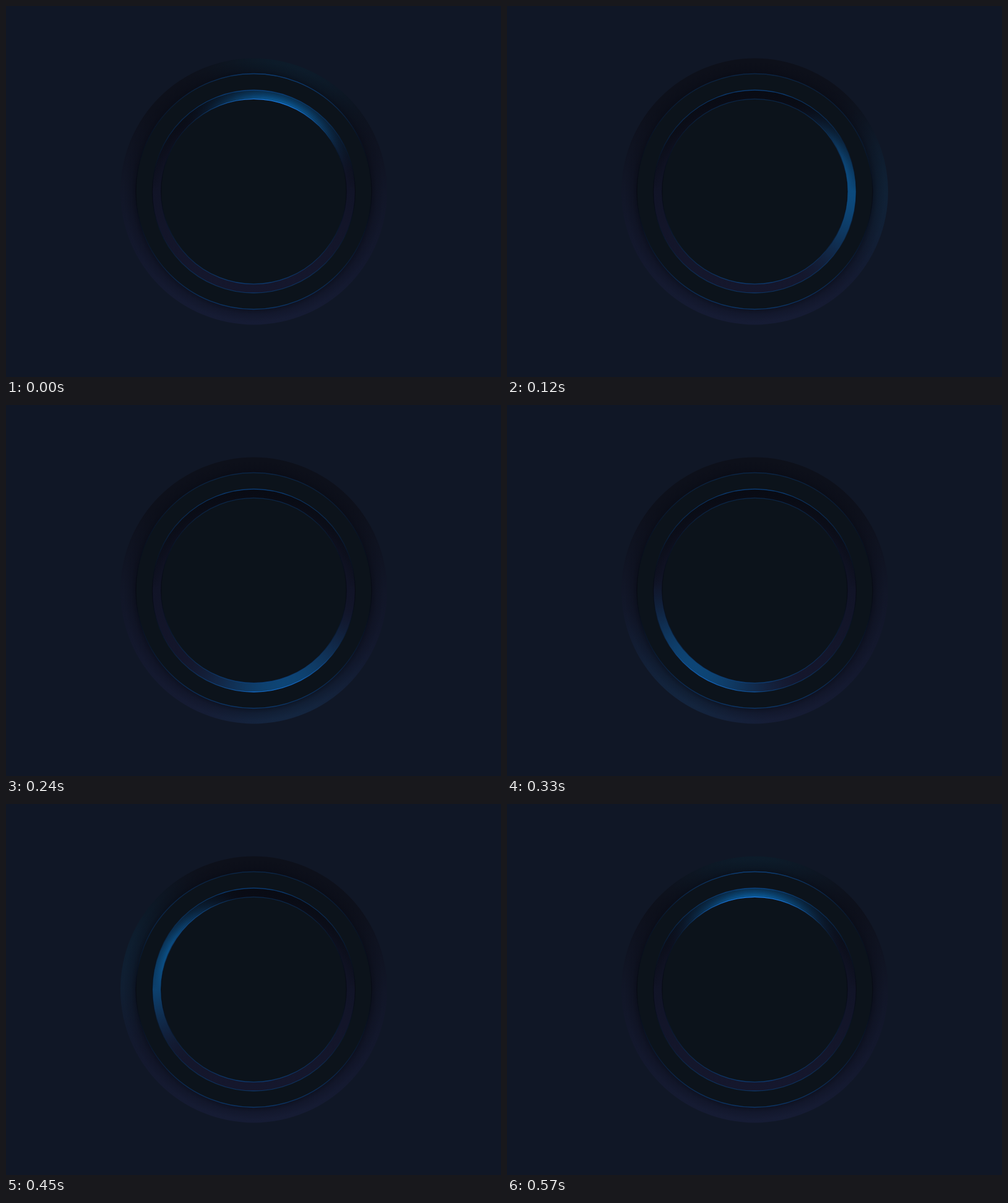
An HTML page with a canvas that plays this animation: 800x600 px, repeating every 0.6 s.

```html
<!DOCTYPE html>
<html lang="en">
<head>
<meta charset="utf-8">
<title>Glowing dial</title>
<style>
  html, body { margin: 0; width: 100%; height: 100%; overflow: hidden; background: #101726; }
  canvas { display: block; width: 800px; height: 600px; }
</style>
</head>
<body>
<canvas id="stage" width="800" height="600"></canvas>
<script>
(() => {
  const ctx = document.getElementById("stage").getContext("2d");
  const TAU = Math.PI * 2;
  const RIM = 215.5, RING_OUT = 190.5, RING_IN = 164, DISC = 149.7;
  const STEP_MS = 30, STEPS = 20;
  const FACE = "#0c131b";

  // Angles run clockwise from the top.
  function sweep(rgb, alphaAt) {
    const gradient = ctx.createConicGradient(-Math.PI / 2, 0, 0);
    const stops = 120;
    for (let i = 0; i <= stops; i++) {
      const alpha = Math.max(0, Math.min(1, alphaAt(i / stops * TAU)));
      gradient.addColorStop(i / stops, `rgba(${rgb},${alpha.toFixed(4)})`);
    }
    return gradient;
  }

  function withStops(gradient, stops) {
    for (const [offset, color] of stops) gradient.addColorStop(offset, color);
    return gradient;
  }

  const vertical = (r, stops) => withStops(ctx.createLinearGradient(0, -r, 0, r), stops);
  const radial = (from, to, stops) =>
    withStops(ctx.createRadialGradient(0, 0, from, 0, 0, to), stops);

  function disc(r, fill) {
    ctx.beginPath();
    ctx.arc(0, 0, r, 0, TAU);
    ctx.fillStyle = fill;
    ctx.fill();
  }

  function band(outer, inner, fill) {
    ctx.beginPath();
    ctx.arc(0, 0, outer, 0, TAU);
    ctx.arc(0, 0, inner, 0, TAU, true);
    ctx.fillStyle = fill;
    ctx.fill();
  }

  function line(r, stroke, width = 1.3) {
    ctx.beginPath();
    ctx.arc(0, 0, r, 0, TAU);
    ctx.strokeStyle = stroke;
    ctx.lineWidth = width;
    ctx.stroke();
  }

  const upper = a => Math.max(0, Math.cos(a));
  const lower = a => Math.max(0, -Math.cos(a));
  const side = a => Math.abs(Math.sin(a));

  // Light falloff around the direction of the beam.
  function beam(a, heading, halfWidth) {
    const distance = Math.abs(Math.atan2(Math.sin(a - heading), Math.cos(a - heading)));
    const reach = halfWidth * Math.PI / 180;
    return distance < reach ? Math.cos(distance / reach * Math.PI / 2) ** 2 : 0;
  }

  function edge(r, upperAlpha, lowerAlpha) {
    line(r, sweep("5,7,16", a => 0.65 * side(a) ** 3));
    line(r, sweep("10,74,146", a => upperAlpha * upper(a) ** 1.5 + lowerAlpha * lower(a) ** 1.5));
  }

  function draw(heading) {
    ctx.setTransform(1, 0, 0, 1, 0, 0);
    ctx.fillStyle = "#101726";
    ctx.fillRect(0, 0, 800, 600);
    ctx.translate(400.4, 300);

    disc(RIM, vertical(RIM, [
      [0, "#0d101a"], [0.2, "#0d101b"], [0.5, "#111627"], [0.75, "#13182d"], [1, "#161c34"]
    ]));
    band(RIM, RING_OUT, sweep("10,84,120", a => 0.17 * beam(a, heading, 55)));
    band(RIM, RING_OUT, radial(RING_OUT, RING_OUT + 20, [
      [0, "rgba(8,10,20,.55)"], [0.4, "rgba(8,10,20,.22)"], [1, "rgba(8,10,20,0)"]
    ]));

    disc(RING_OUT, FACE);
    edge(RING_OUT, 0.36, 0.6);
    line(RING_OUT, sweep("14,90,175", a => 0.42 * beam(a, heading, 60) * upper(a)));

    disc(RING_IN, vertical(RING_IN, [
      [0, "#090b14"], [0.2, "#0c0e1a"], [0.5, "#111427"], [1, "#15172d"]
    ]));
    band(RING_IN, DISC, sweep("11,84,141", a =>
      beam(a, heading, 66) * (0.84 + 0.14 * upper(a) - 0.1 * lower(a))));

    // The ring casts a shadow on the upper half of the groove.
    const shade = sweep("7,11,19", a => 0.4 * upper(a) ** 0.5);
    for (let r = DISC + 4; r < RING_IN; r += 2.5) {
      ctx.globalAlpha = 0.35;
      band(RING_IN, r, shade);
    }
    ctx.globalAlpha = 1;

    edge(RING_IN, 0.72, 0.56);
    line(RING_IN, sweep("22,112,208", a => 0.95 * beam(a, heading, 62) * lower(a) ** 2));

    disc(DISC, FACE);
    edge(DISC, 0.4, 0.65);
    line(DISC, sweep("27,124,228", a => beam(a, heading, 66) * upper(a) ** 2));
  }

  function frame() {
    const step = Math.floor(performance.now() / STEP_MS) % STEPS;
    draw((step + 1) / STEPS * TAU);
    requestAnimationFrame(frame);
  }
  frame();
})();
</script>
</body>
</html>
```
